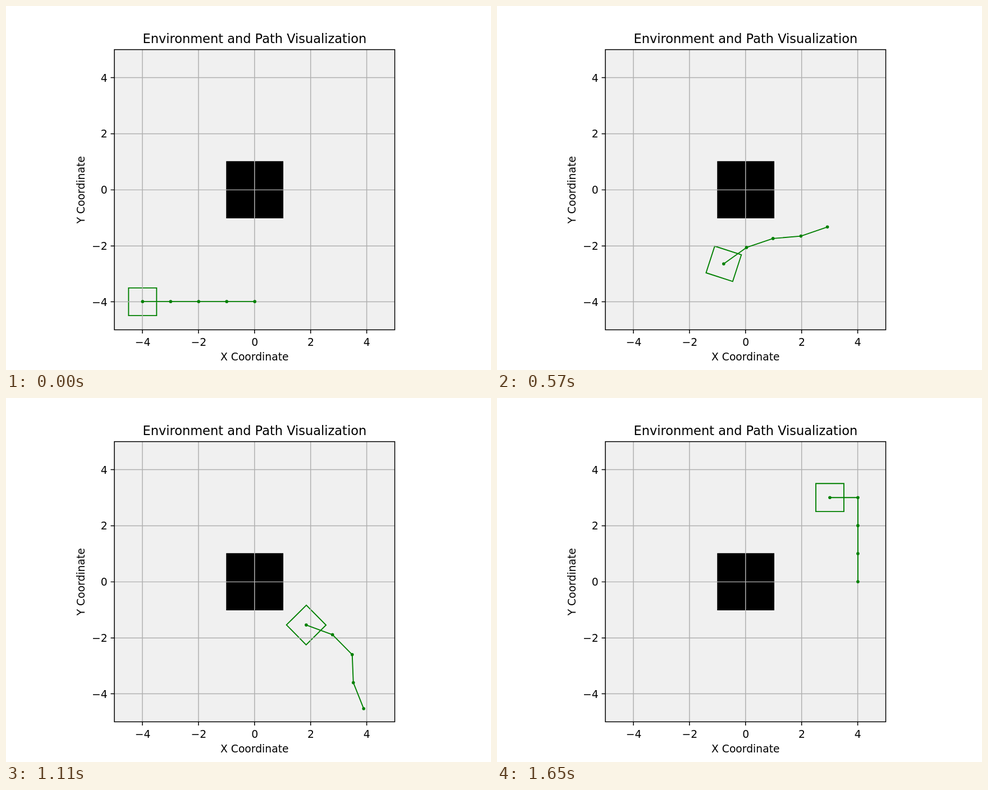
An HTML page for the animation above (1680 ms loop, 864 px wide and 648 px high).

```html
<!DOCTYPE html>
<html lang="en">
<head>
<meta charset="utf-8">
<title>Environment and Path Visualization</title>
<style>
  html, body { margin: 0; width: 100%; height: 100%; overflow: hidden; background: #fff; }
  svg { display: block; width: 864px; height: 648px; }
  text { font: 27.78px "DejaVu Sans", sans-serif; text-anchor: middle; }
  .title { font-size: 33.33px; }
  .ytick { text-anchor: end; }
  .grid { stroke: #b0b0b0; stroke-width: 2.22; }
  .axis { stroke: #000; stroke-width: 2.22; fill: none; }
  .obstacle { stroke: #000; stroke-width: 2.78; }
  .robot { stroke: #008000; stroke-width: 2.78; fill: none; }
  #arm { stroke-linejoin: round; stroke-linecap: square; }
  #joints { fill: #008000; }
</style>
</head>
<body>
<svg viewBox="0 0 1280 960">
  <defs><clipPath id="plot"><rect x="286" y="115" width="740" height="739"/></clipPath></defs>
  <rect x="286" y="115" width="740" height="739" fill="#f0f0f0"/>
  <g clip-path="url(#plot)">
    <polygon id="obstacle" class="obstacle"/>
    <polygon id="base" class="robot"/>
    <path id="grid" class="grid"/>
    <polyline id="arm" class="robot"/>
    <g id="joints"></g>
  </g>
  <path id="ticks" class="axis"/>
  <rect class="axis" x="286" y="115" width="740" height="739"/>
  <g id="labels"></g>
  <text class="title" x="656" y="98.5">Environment and Path Visualization</text>
  <text x="656" y="934.4">X Coordinate</text>
  <text transform="translate(208 484.8) rotate(-90)">Y Coordinate</text>
</svg>
<script>
const STEP = 30, STEPS = 56, UNIT = 73.92;
const $ = id => document.getElementById(id);
const toX = x => 656 + x * UNIT;
const toY = y => 484.8 - y * UNIT;
const rad = deg => deg * Math.PI / 180;

// Base position, tilt and link headings (degrees) at a few steps.
const keys = [
  { at: 0, base: [-4, -4], tilt: 0, links: [0, 0, 0, 0] },
  { at: 12, base: [-1.94, -3.7], tilt: -11.4, links: [27, 9.6, 3.7, -6.8] },
  { at: 19, base: [-0.78, -2.64], tilt: -18, links: [35.6, 18.7, 5, 19] },
  { at: 27, base: [0.275, -1.72], tilt: -32.5, links: [25.8, -3.8, -25.8, -24] },
  { at: 37, base: [1.845, -1.54], tilt: -45.3, links: [-20.3, -45.3, -87.7, -68.3] },
  { at: 43, base: [2.29, -0.94], tilt: -16.5, links: [-15.7, -38.7, -103.3, -93] },
  { at: 55, base: [3, 3], tilt: 0, links: [0, -90, -90, -90] }
].map(k => ({ at: k.at, values: [...k.base, k.tilt, ...k.links] }));

// Slope through a key's neighbours; the motion rests at both ends.
function slope(i, n) {
  const before = keys[i - 1], after = keys[i + 1];
  if (!before || !after) return 0;
  return (after.values[n] - before.values[n]) / (after.at - before.at);
}

function poseAt(step) {
  const i = Math.max(1, keys.findIndex(k => k.at >= step));
  const from = keys[i - 1], to = keys[i];
  const span = to.at - from.at, u = (step - from.at) / span, w = 1 - u;
  return from.values.map((v, n) =>
    v * w * w * (1 + 2 * u) + to.values[n] * u * u * (3 - 2 * u) +
    span * u * w * (slope(i - 1, n) * w - slope(i, n) * u));
}

function addSvg(parent, tag, attrs, text = "") {
  const node = document.createElementNS("http://www.w3.org/2000/svg", tag);
  for (const name in attrs) node.setAttribute(name, attrs[name]);
  node.textContent = text;
  return parent.appendChild(node);
}

// Axis-aligned outlines sit on half pixels.
function toPixel([x, y], snap) {
  const px = toX(x), py = toY(y);
  return snap ? [Math.round(px) + 0.5, Math.round(py) - 0.5] : [px, py];
}

function square(x, y, size, angle) {
  const c = Math.cos(rad(angle)) * size / 2, s = Math.sin(rad(angle)) * size / 2;
  return [[-1, -1], [1, -1], [1, 1], [-1, 1]]
    .map(([u, v]) => toPixel([x + u * c - v * s, y + u * s + v * c], angle === 0));
}

let grid = "", ticks = "";
for (let v = -4; v <= 4; v += 2) {
  const x = Math.round(toX(v)), y = Math.round(toY(v));
  const label = String(v).replace("-", "\u2212");
  grid += `M${x} 115V854M286 ${y}H1026`;
  ticks += `M${x} 854v9.72M286 ${y}h-9.72`;
  addSvg($("labels"), "text", { x: toX(v) + 0.5, y: 895.8 }, label);
  addSvg($("labels"), "text", { x: 267.5, y: toY(v) + 10.3, class: "ytick" }, label);
}
$("grid").setAttribute("d", grid);
$("ticks").setAttribute("d", ticks);
$("obstacle").setAttribute("points", square(0, 0, 2, 0).join(" "));
const joints = Array.from({ length: 5 }, () => addSvg($("joints"), "circle", { r: 4.15 }));

function draw(step) {
  const [x, y, tilt, ...headings] = poseAt(step);
  const chain = [[x, y]];
  for (const h of headings) {
    const [px, py] = chain[chain.length - 1];
    chain.push([px + Math.cos(rad(h)), py + Math.sin(rad(h))]);
  }
  const points = chain.map(p => toPixel(p, tilt === 0));
  $("base").setAttribute("points", square(x, y, 1, tilt).join(" "));
  $("arm").setAttribute("points", points.join(" "));
  points.forEach(([cx, cy], i) => {
    joints[i].setAttribute("cx", cx);
    joints[i].setAttribute("cy", cy);
  });
}

let start;
function tick(now) {
  start ??= now;
  draw(Math.floor((now - start) / STEP) % STEPS);
  requestAnimationFrame(tick);
}
draw(0);
requestAnimationFrame(tick);
</script>
</body>
</html>
```
